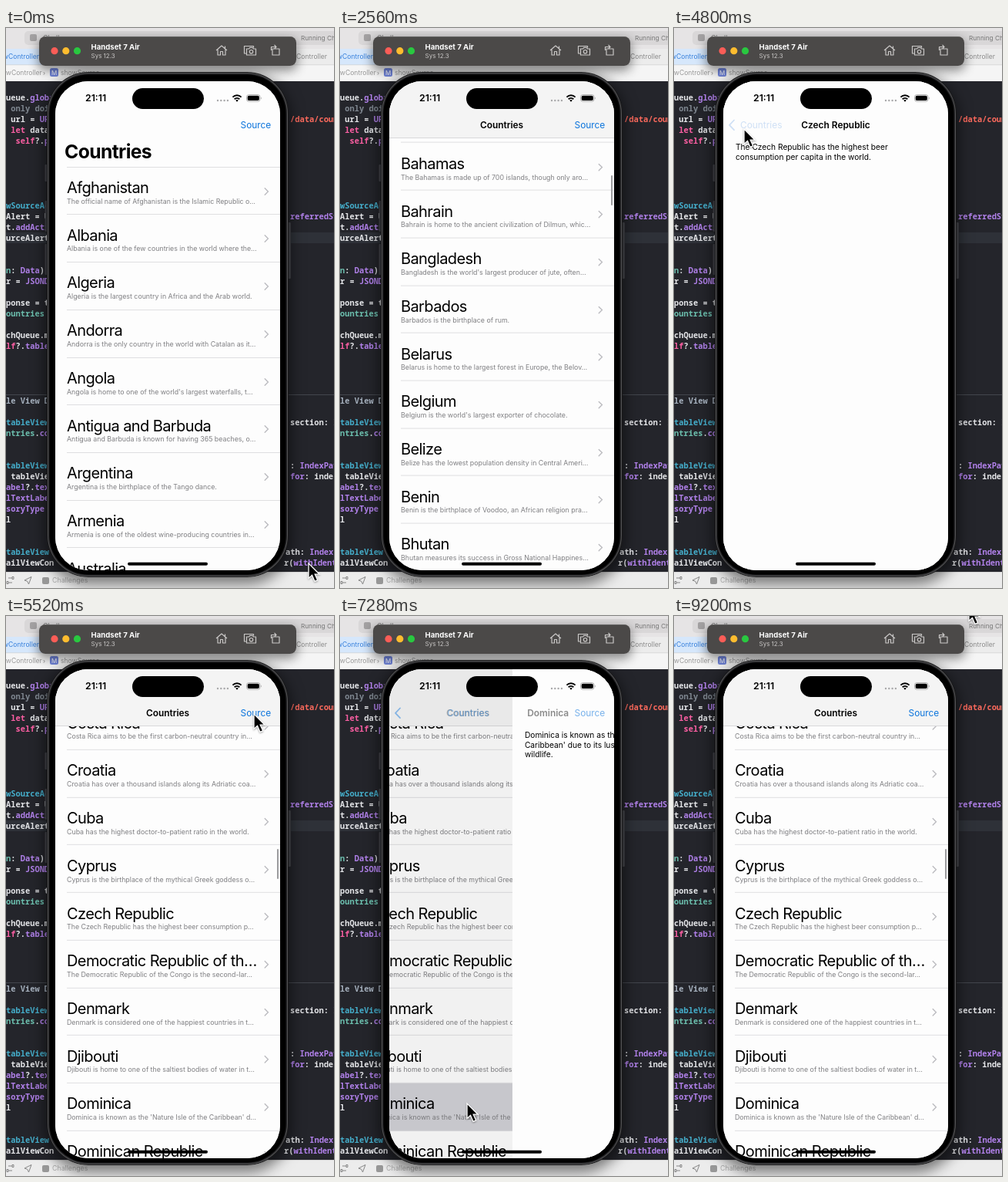
Animation, 426 px wide and 726 px high, one loop 9.28 s. Source, as an HTML page:

```html
<!DOCTYPE html>
<html lang="en">
<head>
<meta charset="utf-8">
<title>Countries</title>
<style>
html,body{margin:0;width:100%;height:100%;overflow:hidden;background:#24252b}
#stage{position:absolute;left:0;top:0;width:426px;height:726px;overflow:hidden;font-family:Inter,sans-serif;color:#000}
#stage div,#stage svg{position:absolute}
.t{line-height:0;white-space:pre}
.mid{transform:translateX(-50%)}
.code{font:600 10.4px/0 "Noto Sans Mono",monospace}
.w{color:#e4e5e8}.p{color:#b181ea}.k{color:#fc5fa3;font-weight:700}.g{color:#7f8790}
.c{color:#45aecb}.e{color:#6cbfae}.r{color:#fc6a5d}.h{color:#a5b0bd;font-weight:700}
.fill{left:0;top:0;width:426px;height:726px}
#screen{clip-path:inset(69px 70px 23px 64px round 43px);background:#fdfdfd}
#list{background:#fdfdfd}
.row{left:64px;width:292px;height:61.7px}
.row .line{left:15px;right:0;bottom:0;height:1px;background:#dfdfe1}
.row .name{left:15px;top:26.3px;font-size:20px;letter-spacing:-.6px}
.row .sub{left:15px;top:44px;font-size:8.8px;color:#7f7f82}
.nav{font-size:11.9px}
.bold{font-weight:600}
.blue{color:#0b74dc}
#detail{left:64px;top:0;width:292px;height:726px;background:#fdfdfd}
#body{left:16px;top:148px;font-size:10.2px;line-height:12.7px;white-space:pre}
</style>
</head>
<body>
<div id="stage">
  <div id="desk" class="fill"></div>
  <div id="phone" class="fill"></div>
  <div id="screen" class="fill">
    <div id="list" class="fill">
      <div id="rows" class="fill">
        <div class="t" id="large" style="left:76px;top:160px;font-size:24.7px;font-weight:700;letter-spacing:-.025em">Countries</div>
        <div style="left:79px;top:180px;width:277px;height:1px;background:#dfdfe1"></div>
      </div>
      <div id="bar" style="left:64px;top:69px;width:292px;height:73px;background:#f4f4f4;border-bottom:1px solid #d9d9db"></div>
      <div id="thumb" style="left:351.5px;width:2.5px;height:39px;border-radius:2px;background:#9c9c9e"></div>
      <div id="shade" class="fill" style="background:#000"></div>
    </div>
    <div id="detail"><div id="body"></div></div>
    <div id="title" class="t nav bold mid" style="top:126px">Countries</div>
    <div id="source" class="t nav" style="left:304.5px;top:126px">Source</div>
    <div id="heading" class="t nav bold mid" style="top:126px"></div>
    <div id="back" class="t nav" style="top:126px">Countries</div>
    <svg id="arrow" class="fill" viewBox="0 0 426 726" fill="none" stroke-width="1.8" stroke-linecap="round" stroke-linejoin="round"><path d="M78 119.5l-6 6.3l6 6.3"/></svg>
    <div id="dim" class="fill" style="background:rgba(0,0,0,.215)"></div>
    <svg class="fill" viewBox="0 0 426 726">
      <rect x="164" y="78" width="93" height="27" rx="13.5"/>
      <g fill="#a9a9ab"><circle cx="275" cy="94" r="1.2"/><circle cx="279.3" cy="94" r="1.2"/><circle cx="283.6" cy="94" r="1.2"/><circle cx="287.9" cy="94" r="1.2"/></g>
      <g fill="none" stroke="#000" stroke-width="2"><path d="M294.4 89.6a8 8 0 0 1 11.2 0M296.7 92.2a4.8 4.8 0 0 1 6.6 0"/></g>
      <path d="M298.2 93.8a2.6 2.6 0 0 1 3.6 0l-1.8 2z"/>
      <rect x="312.5" y="86.6" width="17.5" height="8.6" rx="2.8" fill="none" stroke="#999" stroke-width=".8"/>
      <rect x="313.7" y="87.8" width="15.1" height="6.2" rx="1.8"/>
      <path d="M331 89.4q1.6 1.5 0 3z" fill="#999"/>
      <rect x="158" y="692.8" width="104" height="4" rx="2"/>
    </svg>
    <div class="t bold" style="left:103px;top:91px;font-size:12.3px">21:11</div>
    <div id="alert" style="left:110px;top:343px;width:201px;height:104px;border-radius:10px;overflow:hidden;background:linear-gradient(#e5e7e6,#d3d5d4 70%,#cacbca)">
      <div class="t nav bold mid" style="left:100px;top:23px">Source</div>
      <div class="t mid" style="left:100px;top:38.5px;font-size:9.3px">https://demorow.io/sample/data/</div>
      <div class="t mid" style="left:100px;top:50.5px;font-size:9.3px">countries.json</div>
      <div id="ok" style="left:0;top:71px;width:201px;height:33px;border-top:1px solid #bdbebd;box-sizing:border-box"></div>
      <div class="t nav blue mid" style="left:100px;top:88.7px;font-size:12.3px">OK</div>
    </div>
  </div>
  <svg id="cursor" width="20" height="28" viewBox="-2 -2 20 28" style="overflow:visible;left:-2px;top:-2px"><path d="M0 0V19.4L4.5 15.4L8 23.4L11.6 21.8L8.2 14.2H14.2Z" stroke="#fff" stroke-width="1.3" style="filter:drop-shadow(0 1px 1px rgba(0,0,0,.35))"/></svg>
</div>
<script>
const $ = id => document.getElementById(id);
const LOOP = 9280, STEP = 80, ROW = 61.71, TOP = 180.7;

const countries = `Afghanistan|The official name of Afghanistan is the Islamic Republic o…
Albania|Albania is one of the few countries in the world where the…
Algeria|Algeria is the largest country in Africa and the Arab world.
Andorra|Andorra is the only country in the world with Catalan as it…
Angola|Angola is home to one of the world's largest waterfalls, t…
Antigua and Barbuda|Antigua and Barbuda is known for having 365 beaches, o…
Argentina|Argentina is the birthplace of the Tango dance.
Armenia|Armenia is one of the oldest wine-producing countries in…
Australia|Australia is home to the largest coral reef system in the w…
Austria|Austria is home to the oldest zoo in the world.
Azerbaijan|Azerbaijan is known as the Land of Fire.
Bahamas|The Bahamas is made up of 700 islands, though only aro…
Bahrain|Bahrain is home to the ancient civilization of Dilmun, whic…
Bangladesh|Bangladesh is the world's largest producer of jute, often…
Barbados|Barbados is the birthplace of rum.
Belarus|Belarus is home to the largest forest in Europe, the Belov…
Belgium|Belgium is the world's largest exporter of chocolate.
Belize|Belize has the lowest population density in Central Ameri…
Benin|Benin is the birthplace of Voodoo, an African religion pra…
Bhutan|Bhutan measures its success in Gross National Happines…
Bolivia|Bolivia is home to the world's largest salt flat.
Bosnia and Herzegovina|Bosnia and Herzegovina has one of the last old forests…
Botswana|Botswana has the largest elephant population in the world.
Brazil|Brazil is home to most of the Amazon rainforest.
Brunei|Brunei has one of the largest palaces in the world.
Bulgaria|Bulgaria is the oldest country in Europe to keep its name.
Burkina Faso|Burkina Faso means 'Land of Honest People'.
Burundi|Burundi is famous for its traditional drummers.
Cabo Verde|Cabo Verde is made up of ten volcanic islands.
Cambodia|Cambodia is home to the largest temple in the world.
Cameroon|Cameroon is known as 'Africa in miniature'.
Canada|Canada has more lakes than the rest of the world combin…
Central African Republic|The Central African Republic has a rich wildlife.
Chad|Chad is named after the lake on its western border.
Chile|Chile is home to the driest desert in the world.
China|China is home to the longest wall in the world.
Colombia|Colombia is the world's leading source of emeralds.
Comoros|Comoros is known as the 'Perfume Islands'.
Congo|Congo is home to a large gorilla population.
Costa Rica|Costa Rica aims to be the first carbon-neutral country in…
Croatia|Croatia has over a thousand islands along its Adriatic coa…
Cuba|Cuba has the highest doctor-to-patient ratio in the world.
Cyprus|Cyprus is the birthplace of the mythical Greek goddess o…
Czech Republic|The Czech Republic has the highest beer consumption p…
Democratic Republic of th…|The Democratic Republic of the Congo is the second-lar…
Denmark|Denmark is considered one of the happiest countries in t…
Djibouti|Djibouti is home to one of the saltiest bodies of water in t…
Dominica|Dominica is known as the 'Nature Isle of the Caribbean' d…
Dominican Republic|The Dominican Republic is home to the oldest city in the…`
  .split('\n').map(line => line.split('|'));

// Pushed pages: row, tap, push start, back pressed, pop start, text
const visits = [
  {row: 0, tap: 640, push: 720, press: 1600, pop: 1720, text: 'The official name of Afghanistan is the Islamic\nRepublic of Afghanistan.'},
  {row: 43, tap: 3920, push: 4000, press: 4720, pop: 4840, text: 'The Czech Republic has the highest beer\nconsumption per capita in the world.'},
  {row: 47, tap: 7120, push: 7200, press: 8240, pop: 8360, text: "Dominica is known as the 'Nature Isle of the\nCaribbean' due to its lush rainforests and abundant\nwildlife."}
];
const cursorPath = [[0,393,694],[160,393,694],[600,190,214],[880,190,214],[1440,117,124],[1840,117,124],
  [2160,250,560],[2240,250,560],[2480,236,-30],[2800,236,-30],[2960,225,520],[3040,225,520],[3280,215,110],
  [3400,215,110],[3760,175,386],[4160,175,386],[4640,91,131],[5040,91,131],[5520,322,127],[5800,322,127],
  [6320,232,440],[6640,232,440],[7040,165,632],[7520,165,632],[7920,130,225],[8000,123,203],[8200,103,126],
  [8600,103,126],[9160,383,-13],[9280,383,-13]];
const scrollPath = [[0,0],[2240,0],[2560,710.4],[3040,1270],[3280,1680],[3840,2475.2],[9280,2475.2]];

// Code: y, x, then coloured pieces (first letter is the class)
const code = `90|0|wueue.|pglobal()
104|0|g only doing
118|0|w url = |pURL
132|0|k let |wdata
146|0|k  self|w?.|pp
230|0|cwSourceAc
244|0|wAlert = U
258|0|wt.|paddActi
272|0|wurceAlert
314|0|en|w: |pData|w)
328|0|wr = |pJSONDe
356|0|wponse = t
370|0|eountries
398|0|wchQueue.ma
412|0|klf|w?.|ptable
483|0|hle View D
511|0|ctableView
525|0|entries|w.|pcou
567|0|ctableView
581|0|w tableVie
595|0|pabel|w?.|ptex
609|0|plTextLabe
623|0|psoryType
637|0|wl
679|0|ctableView
693|0|wailViewCon
118|369|r/data/coun
244|369|preferredSt
511|369|wsection: I
567|369|w: |pIndexPat
581|369|pfor|w: inde
679|363|wath: |pIndexP
693|361|wr(|pwithIdenti`;

const box = (x, y, w, h, fill, rx = 0) => `<rect x="${x}" y="${y}" width="${w}" height="${h}" rx="${rx}" fill="${fill}"/>`;
const dot = (x, y, r, fill) => `<circle cx="${x}" cy="${y}" r="${r}" fill="${fill}"/>`;
const label = (x, y, size, color, text, more = '') =>
  `<div class="t" style="left:${x}px;top:${y}px;font-size:${size}px;color:${color};${more}">${text}</div>`;
const svg = inner => `<svg class="fill" viewBox="0 0 426 726">${inner}</svg>`;
const stroke = (d, color, width) => `<path d="${d}" fill="none" stroke="${color}" stroke-width="${width}" stroke-linejoin="round"/>`;

function buildDesk() {
  const codeHtml = code.split('\n').map(line => {
    const [y, x, ...parts] = line.split('|');
    const spans = parts.map(s => `<span class="${s[0]}">${s.slice(1)}</span>`).join('');
    return `<div class="t code" style="left:${x}px;top:${y}px">${spans}</div>`;
  }).join('');
  $('desk').innerHTML = svg(
    box(0, 0, 426, 27, '#e6e4e5') + box(24, 4, 420, 18, '#d9d7d8', 5) + box(31, 8, 9, 9, '#a3a1a2', 2) +
    box(0, 27, 426, 21, '#ececec') + box(0, 27, 48, 21, '#d6e7fb') + box(0, 48, 426, 21, '#f5f5f5') +
    box(0, 47.5, 426, .7, '#d0d0d0') + box(57, 52, 11, 11, '#6f83d8', 2.5) +
    box(0, 69, 426, 636, '#24252b') + box(0, 265, 426, 14, '#2e3138') + box(0, 475, 426, 1, '#43464d') +
    box(0, 705, 426, 21, '#ececec') + box(0, 705, 426, .8, '#cfcfcf') +
    box(47, 712, 9, 9, '#989898', 2) +
    stroke('M3 713h5M3 719h5M8 711.5h2v3h-2zM1 717.5h2v3h-2z', '#868686', 1) +
    stroke('M24 716l9-4.5l-3.5 9.5l-1.8-3.8z', '#868686', 1)) +
    label(48, 13, 9, '#777', 'Challenges') + label(383, 13, 8.2, '#777', 'Running Challenges') +
    label(-4, 37, 8.6, '#3982dd', 'wController') + label(370, 37, 8.6, '#8c8c8c', 'wController') +
    label(-5, 58, 8.6, '#999', 'ewController') + label(48, 58, 8, '#888', '›') +
    label(59, 58, 8, '#fff', 'M') + label(71, 58, 8.6, '#999', 'showSource') +
    label(60, 716, 8.8, '#aaa', 'Challenges') + codeHtml;
}

function buildPhone() {
  $('phone').innerHTML =
    `<div style="left:53px;top:57px;width:314px;height:655px;border-radius:54px;box-shadow:0 6px 18px 3px rgba(0,0,0,.5)"></div>
     <div style="left:43px;top:11px;width:334px;height:38px;border-radius:8px;box-shadow:0 5px 14px 1px rgba(0,0,0,.45)"></div>` + svg(
    box(50.5, 177, 4, 22, '#303135', 1) + box(50.5, 224, 4, 40, '#303135', 1) + box(50.5, 280, 4, 40, '#303135', 1) +
    box(365, 252, 5, 73, '#303135', 1) +
    box(53, 57, 314, 655, '#161617', 54) + box(54, 58, 312, 653, '#545456', 53) +
    box(55, 59, 310, 651, '#222224', 52) + box(56.5, 60.5, 307, 648, '#000', 50) +
    box(43, 11, 334, 38, '#4b4948', 8) +
    stroke('M50 11.5h320', '#686665', .8) +
    dot(63, 29.7, 4.6, '#fc5d57') + dot(77.8, 29.7, 4.6, '#fdbc2f') + dot(92.5, 29.7, 4.6, '#29c840') +
    stroke('M273 29l7-6l7 6M275 28v7h3.5v-4.5h3v4.5h3.5v-7M284.5 26.5v-3', '#c9c7c6', 1.2) +
    stroke('M312 33h-2.5v-9.5h12v2M312.5 27h3l1.2-1.6h3.6l1.2 1.6h3v8h-12z', '#c9c7c6', 1.2) +
    '<circle cx="318.5" cy="30.7" r="2.2" fill="none" stroke="#c9c7c6" stroke-width="1.2"/>' +
    stroke('M346 27h9v8h-9zM344.5 29v-4.5h6M348.5 22l2.5 2.5l-2.5 2.5', '#c9c7c6', 1.2)) +
    label(110.5, 25, 9.6, '#fff', 'Handset 7 Air', 'font-weight:700') + label(110.5, 35.7, 8, '#c8c6c5', 'Sys 12.3');
}

const rowEls = countries.map(([name, sub], i) => {
  const el = document.createElement('div');
  el.className = 'row';
  el.style.top = TOP + i * ROW + 'px';
  el.innerHTML = `<div class="t name">${name}</div><div class="t sub">${sub}</div><div class="line"></div>
    <svg style="left:271px;top:25px" width="8" height="12" fill="none" stroke="#bcbcc0" stroke-width="1.4" stroke-linecap="round"><path d="M1.2 1.8l4.2 4.2l-4.2 4.2"/></svg>`;
  $('rows').append(el);
  return el;
});

const clamp = v => Math.max(0, Math.min(1, v));
const easeOut = v => 1 - (1 - v) ** 3;
const easeInOut = v => v * v * (3 - 2 * v);
const ramp = (t, start, length) => clamp((t - start) / length);

function along(path, t, ease) {
  const i = Math.max(1, path.findIndex(k => k[0] > t));
  const a = path[i - 1], b = path[i];
  const k = ease((t - a[0]) / (b[0] - a[0]));
  return a.slice(1).map((v, n) => v + (b[n + 1] - v) * k);
}

function render(t) {
  const [scroll] = along(scrollPath, t, v => 1 - (1 - v) ** 1.7);
  const visit = visits.find(v => t < v.pop + 560) || visits[2];
  const p = easeOut(ramp(t, visit.push, 440)) - easeOut(ramp(t, visit.pop, 440));
  const selected = t >= visit.tap ? 1 - ramp(t, visit.pop + 160, 320) : 0;
  const alert = easeOut(ramp(t, 5680, 240)) - ramp(t, 6520, 240);
  const collapsed = ramp(scroll, 24, 14);

  $('rows').style.transform = `translateY(${-scroll}px)`;
  rowEls.forEach((el, i) => {
    const y = TOP + i * ROW - scroll;
    el.style.display = y > 0 && y < 726 ? '' : 'none';
    el.style.background = i === visit.row && selected ? `rgba(209,209,214,${selected})` : 'none';
  });
  $('large').style.opacity = 1 - p;
  $('bar').style.opacity = ramp(scroll, 4, 20);
  $('thumb').style.top = 146 + scroll * .063 + 'px';
  $('thumb').style.opacity = ramp(scroll, 0, 20);
  $('shade').style.opacity = p * .1;
  $('list').style.transform = `translateX(${-88 * p}px)`;
  $('detail').style.transform = `translateX(${292 * (1 - p)}px)`;
  $('detail').style.visibility = p > 0 ? 'visible' : 'hidden';
  $('body').textContent = visit.text;

  $('title').style.left = 210 - 97 * p + 'px';
  $('title').style.opacity = collapsed * clamp(1 - 1.6 * p);
  $('heading').textContent = countries[visit.row][0];
  $('heading').style.left = 210 + 110 * (1 - p) + 'px';
  $('heading').style.opacity = p;
  const tint = t >= visit.press && t < visit.pop + 440 ? '#cfe0f5' : '#0b74dc';
  $('back').style.left = 86 + 97 * (1 - p) + 'px';
  $('back').style.color = tint;
  $('arrow').style.stroke = tint;
  $('back').style.opacity = $('arrow').style.opacity = p;
  $('source').style.opacity = 1 - p;
  $('source').style.color = alert > .5 ? '#77787a' : t >= 5600 && t < 5700 ? '#cfe0f5' : '#0b74dc';

  $('dim').style.opacity = $('alert').style.opacity = alert;
  $('alert').style.transform = `scale(${t < 6200 ? 1.15 - .15 * alert : 1})`;
  $('ok').style.background = t >= 6400 && t < 6520 ? '#c8c9c8' : 'none';

  const [x, y] = along(cursorPath, t, easeInOut);
  $('cursor').style.transform = `translate(${x}px,${y}px)`;
}

function tick() {
  render(Math.floor(performance.now() % LOOP / STEP) * STEP);
  requestAnimationFrame(tick);
}
buildDesk();
buildPhone();
tick();
</script>
</body>
</html>
```
